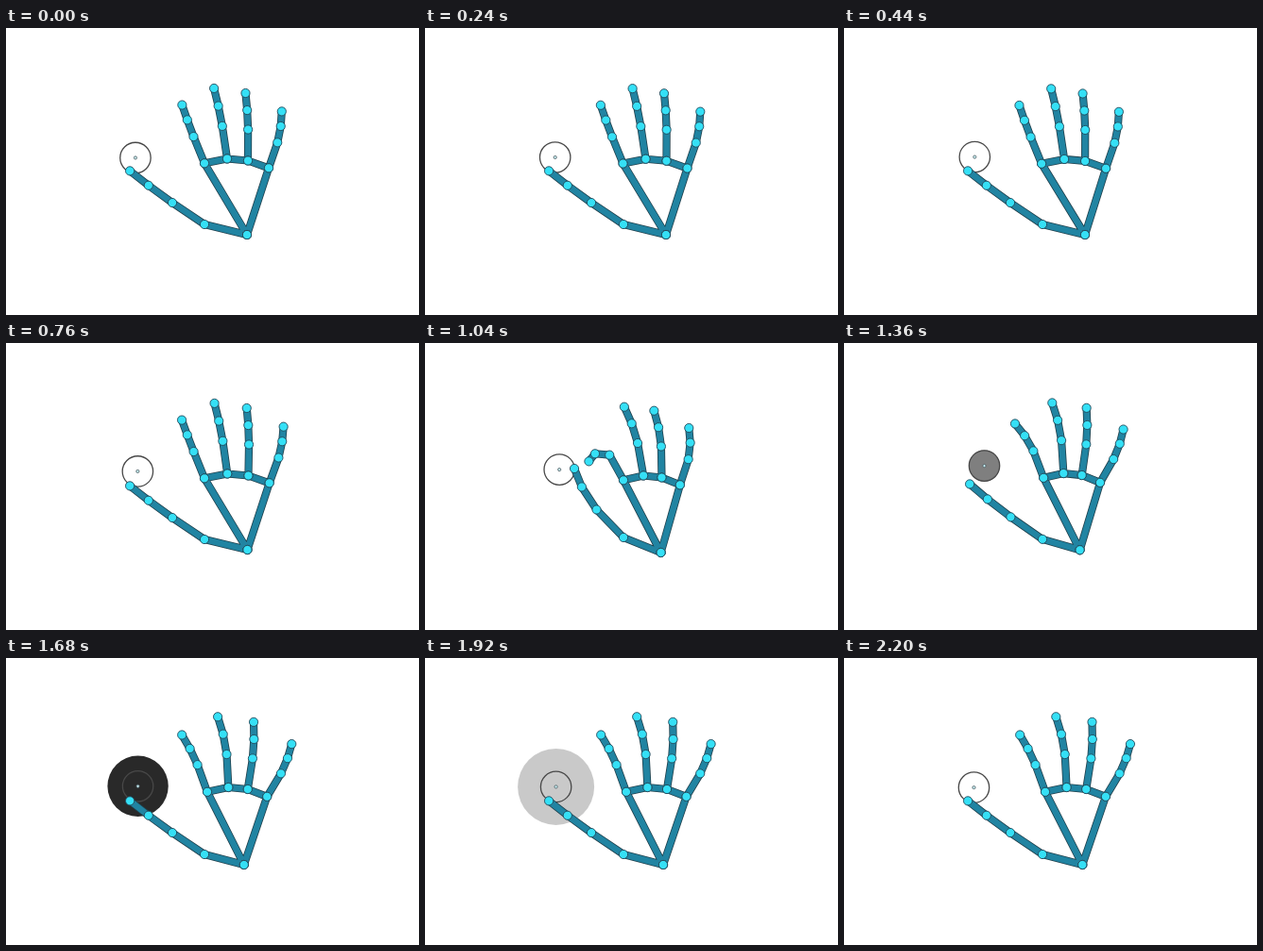
Animation, 437 px wide and 304 px high, one loop 2.24 s. Source, as an HTML page with a canvas:

```html
<!DOCTYPE html>
<html lang="en">
<head>
<meta charset="utf-8">
<title>Hand pinch</title>
<style>
html, body { margin: 0; width: 100%; height: 100%; overflow: hidden; background: #fff; }
canvas { display: block; }
</style>
</head>
<body>
<canvas id="stage" width="437" height="304"></canvas>
<script>
const ctx = document.getElementById('stage').getContext('2d');
const LOOP = 2240, STEP = 40, PALM_X = 210;

// Angles are in degrees, clockwise from straight up.
// turn, curl and shrink say how much a full pinch changes aim, bend and bone length.
const thumb = { x: 210, y: 208, size: 41, ratios: [1, 0.76, 0.61], aim: -56, bend: 2, turn: 12, curl: 9, shrink: 0.08 };
const ratios = [1, 0.62, 0.55];
const fingers = [
  { x: 210, y: 143.3, size: 30.5, aim: -22, bend: 1, turn: -7, curl: -57, shrink: 0.19 },
  { x: 234, y: 138.5, size: 35, aim: -8, bend: -3 },
  { x: 256, y: 140.5, size: 33, aim: 1, bend: -3 },
  { x: 278, y: 148.3, size: 28.5, aim: 20, bend: -7.5 }
].map(f => ({ ratios, turn: -2, curl: -4, shrink: 0, ...f }));

// time, palm width, knuckle lift, finger fan, pinch, cursor pull
const keys = [
  [0, 1, 0, -0.1, 0, -0.1],
  [440, 1, -0.3, -0.1, 0, 0.03],
  [760, 1.01, 0, 0, 0, 0.13],
  [860, 1.01, 0, 0, 0, 0.15],
  [1040, 0.88, 0, 0, 1, 0.4],
  [1130, 0.88, 0, 0, 1.12, 0.55],
  [1360, 0.88, 0.4, 0.9, 0.08, 1],
  [1680, 0.93, 1, 1, 0, 0.15],
  [2200, 0.94, 1, 1, 0, -0.05],
  [LOOP, 0.94, 1, 1, 0, -0.05]
];

const ramp = (t, from, to) => Math.min(1, Math.max(0, (t - from) / (to - from)));

function poseAt(t) {
  const i = keys.findIndex(k => k[0] > t), a = keys[i - 1], b = keys[i];
  const k = ramp(t, a[0], b[0]);
  const [, width, lift, fan, pinch, pull] = a.map((v, n) => v + (b[n] - v) * k);
  return { width, lift, fan, pinch, pull };
}

// Follows the three bones of a digit out from its root.
function digit(d, x, y, aim, bend, pinch) {
  const points = [[x, y]];
  d.ratios.forEach((ratio, j) => {
    const angle = (aim + d.turn * pinch + j * (bend + d.curl * pinch)) * Math.PI / 180;
    const length = d.size * ratio * (1 - d.shrink * pinch * j);
    x += length * Math.sin(angle);
    y -= length * Math.cos(angle);
    points.push([x, y]);
  });
  return points;
}

function handLines({ width, lift, fan, pinch }) {
  const across = x => PALM_X + (x - PALM_X) * width;
  const wrist = [across(255), 219 + 3 * pinch];
  const chains = fingers.map((f, i) => digit(
    f, across(f.x) + 3 * lift, f.y + 2 * pinch - 1.5 * lift,
    f.aim + fan * (2 + 3 * i), f.bend + fan * (2 * i - 6), pinch));
  const knuckles = chains.map(c => c[0]);
  const thumbChain = digit(thumb, across(thumb.x), thumb.y - 2 * pinch, thumb.aim, thumb.bend, pinch);
  return [[wrist, ...knuckles, wrist], [wrist, ...thumbChain], ...chains];
}

function disc(x, y, r, fill, stroke, width = 1) {
  ctx.beginPath();
  ctx.arc(x, y, r, 0, Math.PI * 2);
  if (fill) { ctx.fillStyle = fill; ctx.fill(); }
  if (stroke) { ctx.strokeStyle = stroke; ctx.lineWidth = width; ctx.stroke(); }
}

function bones(lines, color, width) {
  ctx.strokeStyle = color;
  ctx.lineWidth = width;
  ctx.lineJoin = 'round';
  ctx.beginPath();
  for (const line of lines)
    line.forEach((point, i) => ctx[i ? 'lineTo' : 'moveTo'](...point));
  ctx.stroke();
}

function drawCursor(t, pull) {
  const x = 138 + 10.5 * pull, y = 136.8 - 6.7 * pull;
  const alpha = (0.5 * ramp(t, 1160, 1360) + 0.34 * ramp(t, 1360, 1680)) * (1 - ramp(t, 1680, 2000));
  if (alpha > 0) disc(x, y, 16.5 + 24 * ramp(t, 1360, 1850), `rgba(0,0,0,${alpha})`);
  disc(x, y, 16.2, null, '#484848', 1.3);
  disc(x, y, 1.6, '#c8f0f4', '#4a5a60', 0.8);
}

function draw(t) {
  const pose = poseAt(t), lines = handLines(pose);
  ctx.fillStyle = '#fff';
  ctx.fillRect(0, 0, 437, 304);
  drawCursor(t, pose.pull);
  bones(lines, '#20404c', 8.2);
  bones(lines, '#2184a2', 6.6);
  for (const [x, y] of lines.flat()) disc(x, y, 4.6, '#35e0f6', '#23485a', 0.9);
}

function tick() {
  draw(Math.floor(performance.now() % LOOP / STEP) * STEP);
  requestAnimationFrame(tick);
}
tick();
</script>
</body>
</html>
```
